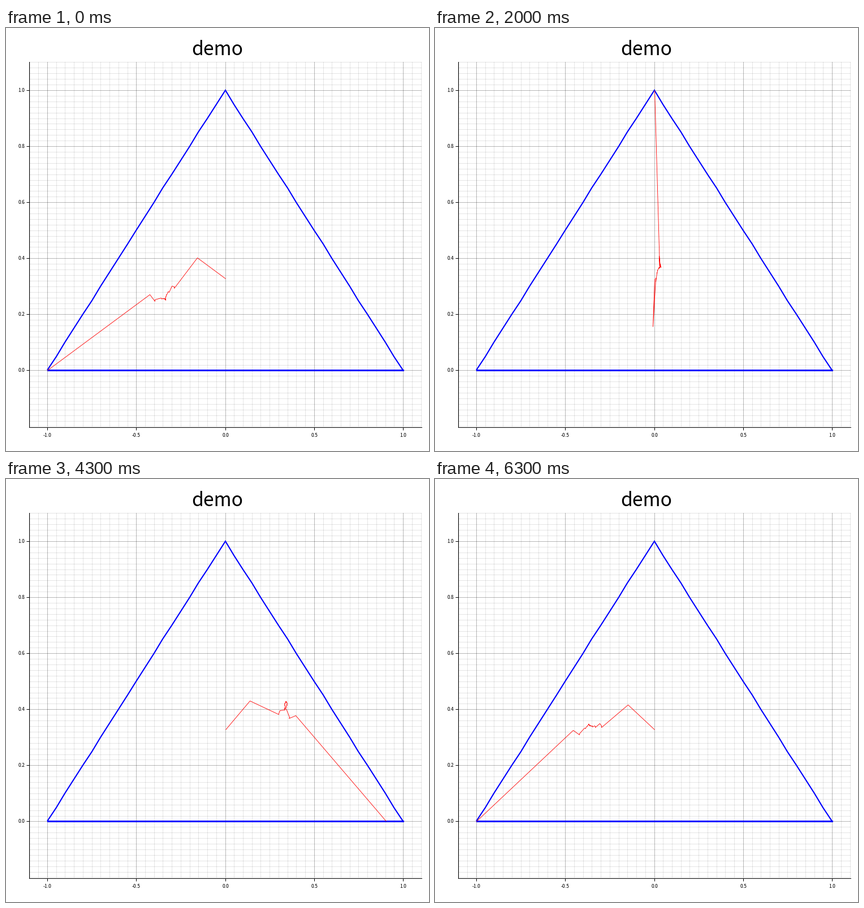
Recreate the animation shown at these times as a matplotlib script. Size 748x748 px, loop 6400 ms.

```python
import numpy as np
import matplotlib.pyplot as plt
from matplotlib.animation import FuncAnimation

SIZE, DPI = 748, 88
PX = 72 / DPI  # points per pixel
FONT = "Noto Sans CJK JP"
LEFT, RIGHT, TOP, BOTTOM = 42, 734, 60, 704  # plot area, inclusive
BLUE, RED = "#0000ff", "#ff0000"


def to_x(v):
    """Centre of the pixel column for a data value."""
    part = (np.asarray(v) + 1.1) / 2.2
    return LEFT + np.floor((RIGHT - LEFT) * part + 1e-3) + 0.5


def to_y(v):
    """Centre of the pixel row for a data value."""
    part = (np.asarray(v) + 0.2) / 1.3
    return BOTTOM - np.floor((BOTTOM - TOP) * part + 1e-3) + 0.5


def triangle():
    """Sample the outline clockwise from the left corner."""
    up = np.linspace(-1, 0, 21)
    down = np.linspace(0, 1, 21)
    base = np.linspace(1, -1, 22)
    x = np.concatenate([up, down, base])
    y = np.concatenate([1 + up, 1 - down, 0 * base])
    return x + 1j * y


outline = triangle()
N = len(outline)
coeffs = np.fft.fft(outline) / N
harmonics = np.arange(N)

fig = plt.figure(figsize=(SIZE / DPI, SIZE / DPI), dpi=DPI, facecolor="white")
ax = fig.add_axes([0, 0, 1, 1])
ax.set_xlim(0, SIZE)
ax.set_ylim(SIZE, 0)
ax.axis("off")


def stroke(x, y, color="black", width=1, **kw):
    return ax.plot(x, y, color=color, lw=width * PX, snap=False,
                   solid_capstyle="butt", solid_joinstyle="miter", **kw)[0]


def grid(xs, ys, alpha):
    style = dict(colors="black", alpha=alpha, linewidths=PX, snap=False,
                 zorder=1)
    ax.vlines(to_x(xs), TOP, BOTTOM + 1, **style)
    ax.hlines(to_y(ys), LEFT, RIGHT + 1, **style)


def label(x, y, text, size, align="center"):
    ax.text(x, y, text, fontsize=size * PX, family=FONT, color="black",
            ha=align, va="baseline")


x_ticks = np.arange(-2, 3) / 2
y_ticks = np.arange(6) / 5
grid(np.arange(-22, 23) / 20, np.arange(-10, 56) / 50, 0.1)
grid(x_ticks, y_ticks, 0.2)

# Axes, ticks and labels
axis_x, axis_y = LEFT - 0.5, BOTTOM + 2.5
stroke([axis_x] * 2, [TOP, axis_y + 0.5])
stroke([axis_x - 0.5, RIGHT + 2], [axis_y] * 2)
for v in x_ticks:
    stroke([to_x(v)] * 2, [axis_y, axis_y + 5])
    label(to_x(v), 723, f"{v:.1f}", 8.5)
for v in y_ticks:
    stroke([axis_x - 5, axis_x], [to_y(v)] * 2)
    label(33.5, to_y(v) + 2.6, f"{v:.1f}", 8.5, "right")
label(373.8, 48, "demo", 33.6)

# Triangle: the slanted strokes sit half a pixel up and left
sides = outline[:42]
stroke(to_x(sides.real) - 0.5, to_y(sides.imag) - 0.5, BLUE, 2.1, zorder=3)
stroke([to_x(-1) - 0.5, to_x(1) + 1.5], [to_y(0)] * 2, BLUE, 3, zorder=3)

arm = stroke([], [], RED, 0.85, zorder=4)


def draw(n):
    """Chain the rotating Fourier terms from the mean to the outline."""
    joints = np.cumsum(coeffs * np.exp(2j * np.pi * harmonics * n / N))
    arm.set_data(to_x(joints.real), to_y(joints.imag))
    return (arm,)


anim = FuncAnimation(fig, draw, frames=N, interval=100, repeat=True,
                     repeat_delay=0, blit=False)
plt.show()
```
